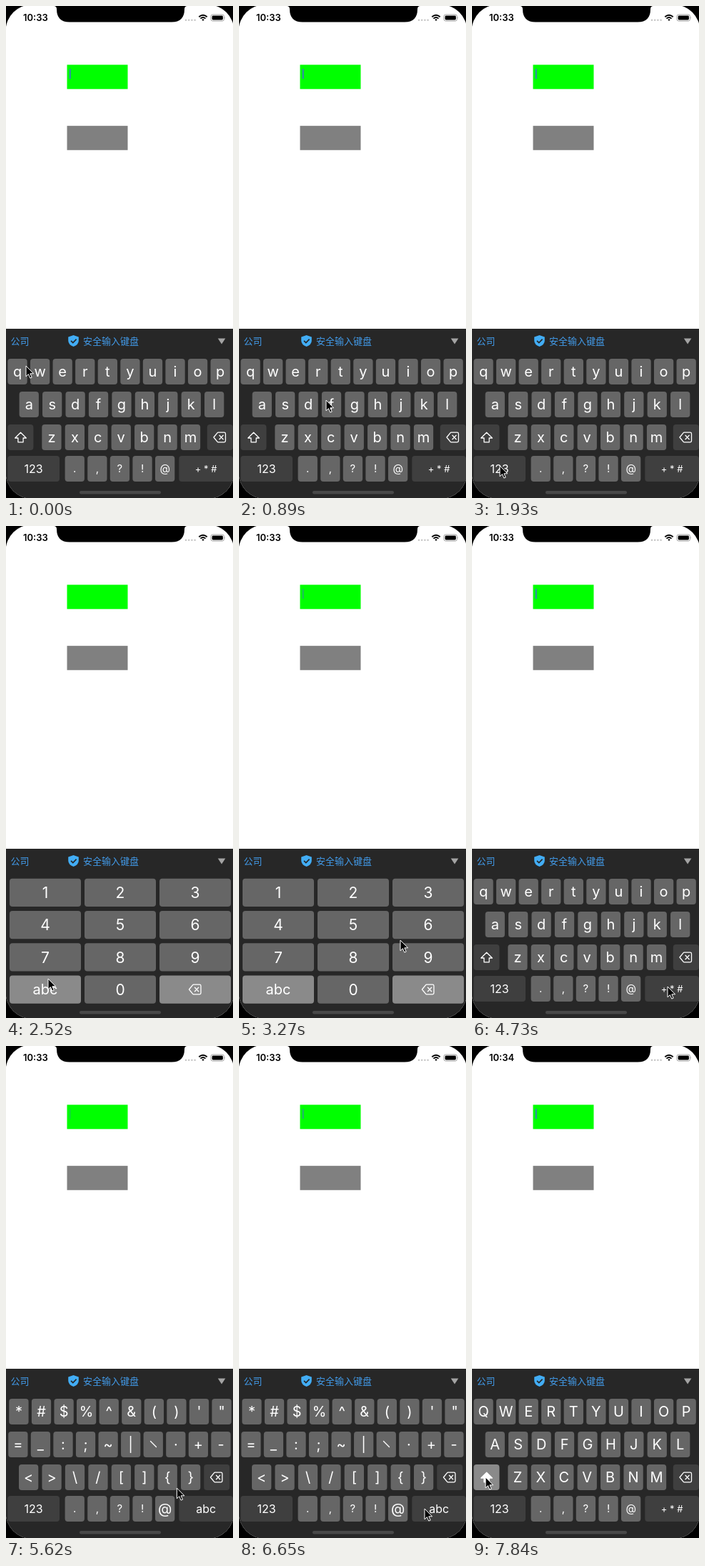
An HTML page for the animation above (8 s loop, 318 by 689 pixels).

```html
<!DOCTYPE html>
<html lang="zh">
<head>
<meta charset="utf-8">
<title>Secure keyboard</title>
<style>
  html, body { margin: 0; width: 100%; height: 100%; overflow: hidden; background: #000; }
  svg { display: block; width: 318px; height: 689px; }
  text { font-family: Inter, Roboto, sans-serif; fill: #fff; white-space: pre; }
  .cjk { font-family: "Noto Sans CJK SC", "Noto Sans CJK", sans-serif; font-size: 13px; fill: #429bea; }
  .mid { text-anchor: middle; }
  .icon { fill: none; stroke: #fff; stroke-width: 1.3; stroke-linejoin: round; stroke-linecap: round; }
  .layer { visibility: hidden; }
  .layer.on { visibility: visible; }
</style>
</head>
<body>
<svg viewBox="0 0 318 689">
  <defs>
    <clipPath id="screen"><rect x="-0.5" y="-2" width="320" height="692" rx="37"/></clipPath>
  </defs>
  <rect width="318" height="689" fill="#000"/>
  <g clip-path="url(#screen)">
    <rect width="318" height="689" fill="#fff"/>
    <path d="M67 0h187q-4 0-4 4.500q0 18-18 18H89q-18 0-18-18q0-4.500-4-4.500z" fill="#000"/>
    <text id="clock" x="24" y="21" font-size="13" font-weight="600" style="fill:#000">10:33</text>
    <g fill="#c4c4c4">
      <circle cx="252" cy="19.800" r="1.200"/><circle cx="256.200" cy="19.800" r="1.200"/>
      <circle cx="260.400" cy="19.800" r="1.200"/><circle cx="264.600" cy="19.800" r="1.200"/>
    </g>
    <g fill="none" stroke="#000" stroke-width="1.900">
      <path d="M270.300 15.200q5.700-5 11.400 0M272.500 17.600q3.500-3 7 0"/>
      <path d="M274.300 18.900q1.700-1.300 3.400 0L276 20.900z" fill="#000" stroke="none"/>
    </g>
    <rect x="287" y="12" width="18.500" height="9" rx="2.600" fill="none" stroke="#a0a0a0"/>
    <rect x="288.600" y="13.600" width="15.300" height="5.800" rx="1.400" fill="#000"/>
    <path d="M306.700 15v3q1.300-1.500 0-3" fill="#a0a0a0"/>
    <rect x="85.500" y="82.300" width="85" height="34" fill="#0f0"/>
    <rect x="85.500" y="167.800" width="85" height="34" fill="#808080"/>
    <rect id="caret" x="89" y="88" width="1.500" height="14" fill="#3f66e0"/>

    <rect y="452" width="318" height="237" fill="#272727"/>
    <text class="cjk" x="6.500" y="474">公司</text>
    <path d="M94.500 461l7.300 2.600v5.200q0 5.400-7.300 8.200q-7.300-2.800-7.300-8.200v-5.200z" fill="#42adf5"/>
    <path d="M91 468.800l2.800 2.800 4.800-5" fill="none" stroke="#272727" stroke-width="1.700"/>
    <text class="cjk" x="108" y="474">安全输入键盘</text>
    <path d="M296.800 465.500h10.600l-5.300 8z" fill="#a4a4a4"/>
    <g id="keys"></g>
    <rect x="103" y="679" width="114" height="4.400" rx="2.200" fill="#484848"/>
  </g>
  <path id="mouse" d="M0 0v14.800l3.400-3.200 2.400 5.500 2.400-1-2.400-5.300h4.800z" fill="#000" stroke="#fff" stroke-width="1"/>
</svg>
<script>
const $ = id => document.getElementById(id);
const KEY = '#666', DARK = '#3f3f3f', LIGHT = '#8a8a8a';
const escape = s => s.replace(/&/g, '&amp;').replace(/</g, '&lt;');

function key(x, y, w, h, label, size, fill = KEY, id = '') {
  const cy = y + h / 2;
  return `<rect ${id && `id="${id}"`} x="${x}" y="${y}" width="${w}" height="${h}" rx="4" fill="${fill}"/>` +
    `<text class="mid" x="${x + w / 2}" y="${cy + size * 0.36}" font-size="${size}">${escape(label)}</text>`;
}
const row = (chars, x, y, pitch, size = 20) =>
  [...chars].map((c, i) => key(x + i * pitch, y, 27.3, 36, c, size)).join('');
const erase = (x, y) =>
  `<path class="icon" transform="translate(${x} ${y})" d="M-8.500 0l5-6.200q.5-.6 1.300-.6h8.400q1.800 0 1.800 1.800v10q0 1.800-1.800 1.800h-8.400q-.8 0-1.300-.6zM-.5-2.700l5.200 5.400M4.700-2.700l-5.200 5.400"/>`;
const shift = fill =>
  `<path class="icon" style="fill:${fill}" d="M20.500 597.200l7.800 7.800h-4.200v5.800h-7.200V605h-4.200z"/>`;
const layer = (id, body) => `<g class="layer" id="${id}">${body}</g>`;

function bottom(id, right, rightSize, atSize) {
  return key(2.3, 630, 72.7, 36, '123', 16, DARK, id + '123') +
    row('.,?!', 82.6, 630, 31.6, 15) + key(209, 630, 27.3, 36, '@', atSize) +
    key(242.3, 630, 75.7, 36, right, rightSize, DARK, id + 'Right');
}
function letters(id, rows, caps) {
  return layer(id, row(rows[0], 2.4, 494, 31.57) + row(rows[1], 18.6, 540, 32.43) +
    key(2.4, 586, 36, 36, '', 1, caps ? LIGHT : DARK) + shift(caps ? '#fff' : 'none') +
    row(rows[2], 50.3, 586, 32.43) +
    key(281.8, 586, 36, 36, '', 1, DARK) + erase(299.5, 604) +
    bottom(id, '+ * #', 13, 15));
}
function symbols() {
  return layer('sym', row('*#$%^&()\'"', 4.3, 494, 31.57) + row('=_:;~| ·+-', 3.2, 540, 31.57) +
    '<path class="icon" d="M202.500 553.500l8 8"/>' + row('<>\\/[]{}', 18, 586, 32.43) +
    key(277.3, 586, 36, 36, '', 1, DARK) + erase(295, 604) +
    bottom('sym', 'abc', 16, 20));
}
function numbers() {
  const pad = ['1', '2', '3', '4', '5', '6', '7', '8', '9', 'abc', '0', ''];
  return layer('num', pad.map((c, i) => key(5 + i % 3 * 105, 493.8 + Math.floor(i / 3) * 45.25, 100, 39.3, c,
    c === 'abc' ? 20 : 21, i === 9 || i === 11 ? LIGHT : KEY, i === 9 ? 'numBack' : '')).join('') +
    erase(265, 649));
}
const qwerty = ['qwertyuiop', 'asdfghjkl', 'zxcvbnm'];
$('keys').innerHTML = letters('low', qwerty, false) +
  letters('up', qwerty.map(r => r.toUpperCase()), true) + symbols() + numbers();

// The screen updates in 54 ticks per loop.
const LOOP = 8000, TICKS = 54, TICK = LOOP / TICKS;
const path = [ // tick, x, y
  [0, 28, 504], [2, 18, 516], [5, 142, 545], [8, 82, 566], [13, 39, 644], [16, 39, 644],
  [17, 59, 634], [20, 150, 590], [22, 226, 580], [24, 230, 604], [25, 72, 652], [28, 72, 652],
  [32, 274, 645], [36, 274, 645], [39, 222, 606], [42, 260, 648], [47, 260, 648],
  [52, 19, 604], [53, 19, 604]
];
const layers = [[0, 'low'], [17, 'num'], [28, 'low'], [36, 'sym'], [46, 'low'], [53, 'up']];

function pointer(n) {
  const i = Math.max(1, path.findIndex(p => p[0] >= n));
  const [a, ax, ay] = path[i - 1], [b, bx, by] = path[i];
  const k = (n - a) / (b - a);
  return [ax + (bx - ax) * k, ay + (by - ay) * k];
}
function blink(ms) {
  const p = ms % 1000;
  if (p < 200) return 1;
  if (p < 600) return Math.max(0, 1 - (p - 200) / 130);
  return Math.min(1, (p - 600) / 100);
}
function draw(ms) {
  const n = Math.min(TICKS - 1, Math.floor((ms + 25) / TICK));
  const current = layers.filter(l => l[0] <= n).pop()[1];
  for (const id of ['low', 'up', 'sym', 'num']) $(id).classList.toggle('on', id === current);
  $('low123').setAttribute('fill', n >= 14 && n <= 16 ? LIGHT : DARK);
  $('lowRight').setAttribute('fill', n === 35 ? LIGHT : DARK);
  $('numBack').setAttribute('fill', n === 27 ? KEY : LIGHT);
  $('clock').textContent = n < 50 ? '10:33' : '10:34';
  $('caret').setAttribute('opacity', blink(n * TICK));
  $('mouse').setAttribute('transform', `translate(${pointer(n)})`);
}
const start = performance.now();
function frame() {
  draw((performance.now() - start) % LOOP);
  requestAnimationFrame(frame);
}
frame();
</script>
</body>
</html>
```
